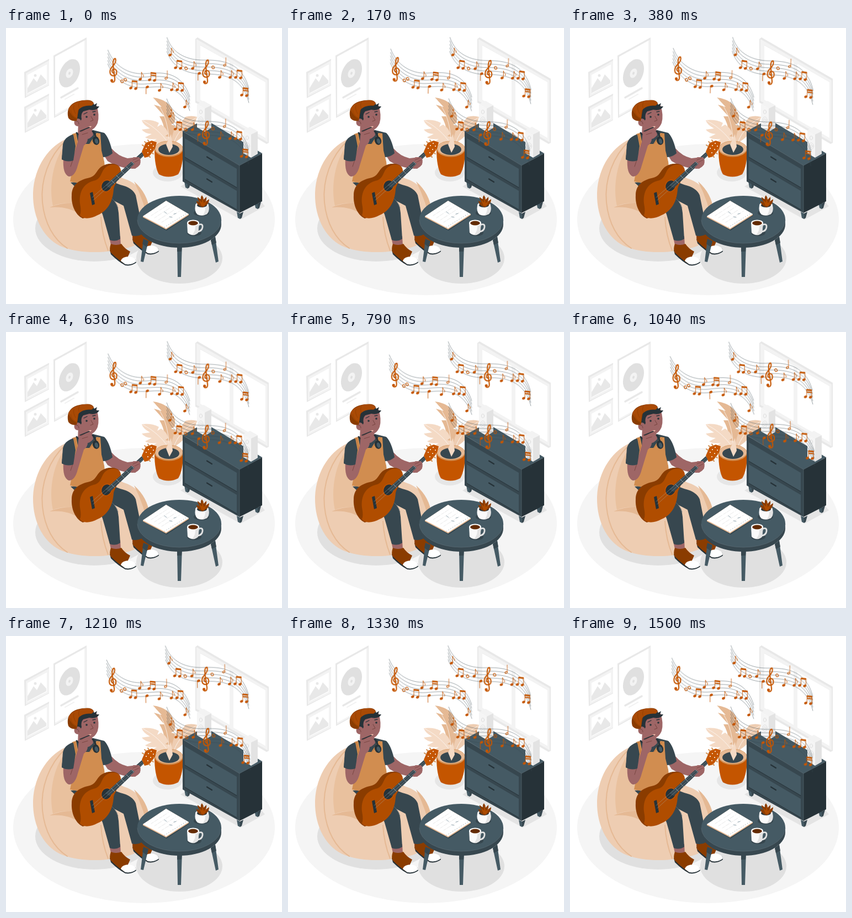
An HTML page without scripts for the animation above (1540 ms loop, 500 by 500 pixels).

```html
<!DOCTYPE html>
<html lang="en">
<head>
<meta charset="utf-8">
<title>Guitar and music</title>
<style>
html, body { margin: 0; width: 100%; height: 100%; overflow: hidden; background: #fff; }
svg { display: block; width: 100vw; height: 100vh; }
.navy { fill: #37474f; }
.slate { fill: #455a64; }
.ink { fill: #263238; }
.skin { fill: #9e6666; }
.orange { fill: #c45500; }
.brown { fill: #8a3c00; }
.tan { fill: #d18d50; }
.peach { fill: #eecdb2; }
.fold { fill: #e5b994; }
.white { fill: #fff; }
.pale { fill: #f3f3f3; }
.edge { fill: #e8e8e8; }
.grey { fill: #e0e0e0; }
.line { fill: none; stroke-linecap: round; stroke-linejoin: round; }
.staff { fill: none; stroke: #37474f; stroke-width: .5; }
.note { fill: #c45500; }
.stem { fill: none; stroke: #c45500; stroke-width: .9; }
.ring { fill: none; stroke: #c45500; stroke-width: 1.1; }
#music { transform-origin: 312px 131px; animation: sway 1540ms linear infinite; }
@keyframes sway {
  0%, 97.3%, 100% { transform: rotate(.22deg); }
  21.62% { transform: rotate(2deg); }
  70.27% { transform: rotate(-2deg); }
}
</style>
</head>
<body>
<svg viewBox="0 0 500 500">
<defs>
  <ellipse id="head" class="note" rx="2.9" ry="2.3" transform="rotate(-25)"/>
  <g id="eighth">
    <use href="#head"/>
    <path class="stem" d="M2.3-1V-13Q2.500-10 5.500-8Q7-6 5.500-4"/>
  </g>
  <g id="pair">
    <use href="#head"/><use href="#head" x="9" y="1"/>
    <path class="stem" d="M2.300-1V-13M11.300 0V-12"/>
    <path class="note" d="M1.900-14L11.700-13V-10L1.900-11Z"/>
  </g>
  <g id="double">
    <use href="#pair"/><path class="note" d="M2-9.500L11.500-8.500V-6.500L2-7.500Z"/>
  </g>
  <g id="down"><use href="#head"/><path class="stem" d="M-2.300 0V13"/></g>
  <ellipse id="ring" class="ring" rx="2.2" ry="2.7" transform="rotate(-30)"/>
  <g id="half" class="ring"><ellipse rx="2.2" ry="1.7" transform="rotate(-25)"/><path d="M2-1V-14" stroke-width=".8"/></g>
  <g id="clef" class="line" stroke="#c45500" stroke-width="2.1">
    <path d="M1 5C-3 5-3-2 2-2C8-2 8 10 1 10C-8 10-7-1-2-6C3-11 6-16 4-21C0-22-1-14 0-8L3 16C3 23-3 23-4 18"/>
    <circle cx="-2.5" cy="18.5" r="1.5" fill="#c45500"/>
  </g>
  <path id="curveA" d="M184 40C196 70 222 84 248 83S316 72 333 125"/>
  <path id="curveB" d="M291 17C302 49 331 58 356 58S427 56 440 110"/>
  <g id="phrase">
    <g class="staff">
      <use href="#curveB"/><use href="#curveB" y="6.3"/><use href="#curveB" y="12.6"/>
      <use href="#curveB" y="18.9"/><use href="#curveB" y="25.2"/>
    </g>
    <use href="#eighth" x="297" y="49"/><use href="#pair" x="307" y="72"/>
    <use href="#ring" x="326" y="73"/><use href="#eighth" x="338" y="73"/>
    <use href="#down" x="350" y="82"/><use href="#clef" x="362" y="79"/>
    <use href="#ring" x="375" y="71"/><use href="#eighth" x="387" y="89"/>
    <use href="#half" x="396" y="67"/><use href="#eighth" x="406" y="89"/>
    <use href="#pair" x="416" y="89"/><use href="#double" x="427" y="121"/>
  </g>
  <g id="picture">
    <path class="edge" d="M33 80L78 56V104L34 127Z"/>
    <path class="pale" d="M36 82L78 59V103L36 124Z"/>
    <path class="white" d="M39 85L74 66V101L39 119Z"/>
    <path class="edge" d="M39 109L50 91L56 98L63 84L73 95V100L39 118Z"/>
    <circle class="edge" cx="53" cy="86" r="2.5"/>
  </g>
  <g id="speaker">
    <path class="pale" d="M0 6L12 0L26 8L14 14Z"/>
    <path d="M0 6L14 14V56L0 48Z" fill="#f5f5f5"/>
    <path d="M14 14L26 8V49L14 56Z" fill="#e3e3e3"/>
    <g class="line" stroke="#d9d9d9" stroke-width=".8">
      <ellipse cx="7" cy="20" rx="2.6" ry="3.5"/><ellipse cx="7" cy="35" rx="4.2" ry="6"/>
      <ellipse cx="7" cy="35" rx="1.8" ry="2.6"/>
    </g>
  </g>
  <g id="drawer">
    <path class="slate" d="M324 200L418 255V289L324 234Z"/>
    <path class="line" d="M324 234L418 289" stroke="#263238"/>
    <path class="line" d="M364 233.500L373 239" stroke="#263238" stroke-width="2.2"/>
  </g>
  <g id="foot">
    <path class="slate" d="M0 0L6 3V13L2 11Z"/>
    <path class="navy" d="M6 3L12 0L9 11L6 13Z"/>
  </g>
  <g id="shoe">
    <path class="ink" d="M188 402L190 410Q203 423 216 430Q227 432 236 425L235 420Z"/>
    <path class="brown" d="M190 391Q187 399 189 406Q203 420 215 427L225 405Q215 400 209 391Q199 395 190 391Z"/>
    <path class="white" d="M208 422Q210 414 224 414Q234 416 236 423Q228 430 216 428Z"/>
  </g>
</defs>

<ellipse cx="250" cy="347" rx="237" ry="137" fill="#f5f5f5"/>

<g id="wall">
  <use href="#picture"/><use href="#picture" y="63"/>
  <path class="edge" d="M86 50L146 17V130L87 163Z"/>
  <path class="pale" d="M89 52L145 21V129L89 160Z"/>
  <path class="white" d="M89 52L142 23V128L89 157Z"/>
  <ellipse class="grey" cx="115" cy="82" rx="17" ry="27" transform="rotate(24 115 82)"/>
  <ellipse class="pale" cx="115" cy="82" rx="6" ry="9" transform="rotate(24 115 82)"/>
  <ellipse class="grey" cx="115" cy="82" rx="1.8" ry="2.8" transform="rotate(24 115 82)"/>
  <path class="line" d="M100 126L130 109" stroke="#e8e8e8" stroke-width="3.5"/>
  <path class="line" d="M107 129L123 120" stroke="#f0f0f0" stroke-width="2"/>
  <path class="edge" fill-rule="evenodd" d="M343 20L347 17L476 92V208L472 210L343 135ZM351 31V131L405 162V61ZM411 64V166L470 200V98Z"/>
  <path class="pale" fill-rule="evenodd" d="M345 20L474 95V207L345 132ZM352 31V130L405 161V61ZM412 65V166L470 199V98Z"/>
</g>

<g id="shadows" class="grey">
  <ellipse cx="160" cy="363" rx="107" ry="60"/>
  <ellipse cx="314" cy="417" rx="78" ry="46"/>
  <ellipse cx="293" cy="262" rx="27" ry="16" fill="#e6e6e6"/>
  <path d="M316 287L331 278L463 316L469 323L425 347Z" opacity=".8"/>
</g>

<g id="plant">
  <path class="fold" d="M291 214C288 195 289 178 278 160L287 160L268 139L282 143L266 126C285 128 299 138 302 150L296 152L304 153Q308 162 305 172L299 175L306 177Q306 195 300 218Z"/>
  <path class="peach" d="M298 219C299 196 305 177 316 165L317 172L325 161Q336 158 346 161Q342 178 331 184L323 184L328 187Q319 199 309 205L303 220Z"/>
  <path d="M297 220C284 219 270 212 264 207L273 201Q259 203 252 198L264 192Q251 191 246 184L261 182Q248 175 246 167Q264 165 277 172L274 179L281 175Q292 182 294 192L288 196L295 197Q302 207 302 219Z" fill="#f4dac5"/>
  <path class="line" d="M296 216C295 185 291 154 267 127M301 216C309 190 323 174 344 163M299 216C283 190 265 177 248 168" stroke="#fff" stroke-width=".7"/>
  <path class="orange" d="M269 220C269 240 272 257 277 265Q294 274 312 265C318 255 321 239 321 220Z"/>
  <ellipse class="tan" cx="295" cy="219" rx="26" ry="14.5"/>
  <ellipse class="fold" cx="295" cy="218" rx="25" ry="13"/>
  <ellipse class="navy" cx="295" cy="220" rx="19" ry="10"/>
  <path d="M290 211L296 226L302 215L299 192Z" fill="#f4dac5"/>
</g>

<g id="cabinet">
  <use href="#foot" x="323" y="278"/><use href="#foot" x="418" y="333"/><use href="#foot" x="450" y="315"/>
  <path class="slate" d="M320 187L360 165L464 227L423 250Z"/>
  <path class="navy" d="M320 187L423 249V335L320 278Z"/>
  <path class="ink" d="M423 249L464 227V314L423 335Z"/>
  <use href="#drawer"/><use href="#drawer" y="40"/>
  <path class="line" d="M320 187L423 249L464 227M423 249V334" stroke="#607078" stroke-width=".6"/>
  <use href="#speaker" x="346" y="132"/><use href="#speaker" x="430" y="179"/>
</g>

<g id="beanbag">
  <path class="peach" d="M112 200C79 212 51 250 49 299C48 346 70 384 103 397C142 411 190 407 225 397C255 388 263 356 260 330C255 300 238 280 211 272Z"/>
  <path d="M106 213C86 240 77 285 85 322Q101 316 124 317V225Z" fill="#e9c19e"/>
  <path class="line" d="M107 205C78 232 62 275 66 316C70 354 86 383 111 399" stroke="#e5b994" stroke-width="2"/>
  <path class="fold" d="M79 325Q101 316 123 317L134 338Q112 322 79 325ZM232 278Q257 300 260 331Q262 341 258 355Q251 315 232 278Z"/>
  <path class="line" d="M172 343Q174 376 185 403" stroke="#e5b994" stroke-width="2"/>
</g>

<g id="person">
  <g id="legs">
    <path class="skin" d="M187 379L207 377L208 394Q199 400 190 393ZM227 371L246 368L247 383Q238 387 230 381Z"/>
    <use href="#shoe" x="41" y="-20"/><use href="#shoe"/>
    <path class="navy" d="M118 270L178 273L207 284Q229 289 235 303L249 372Q239 379 228 376L213 322L190 310Z"/>
    <path class="navy" d="M117 280L166 324Q174 331 177 345L188 384Q198 388 207 382L204 335Q203 318 190 307L161 276Z"/>
    <path class="line" d="M188 306Q200 314 203 326" stroke="#5c6e77" stroke-width=".8"/>
  </g>
  <path class="skin" d="M174 225L191 218Q203 232 220 236L238 234Q245 239 243 247Q235 258 224 254Q202 253 184 241Z"/>
  <path class="navy" d="M128 190Q108 196 104 210L101 238Q110 243 121 240L120 270L178 263L176 234Q185 234 193 227Q188 200 178 190L158 185Z"/>
  <path class="skin" d="M131 171L155 176L158 194Q146 209 130 194Z"/>
  <path class="tan" d="M120 192L127 190L131 210L151 210L164 190L171 191L173 222L178 242L181 271Q153 288 116 278Q122 254 120 223Z"/>
  <path class="line" d="M124 192L128 212M152 210L166 193" stroke="#bd7335"/>
  <g id="face">
    <path class="skin" d="M128 152L164 140Q170 158 166 172Q160 187 145 186Q134 181 130 172Z"/>
    <path class="ink" d="M125 153L133 143L158 136L160 139L165 136L163 142L169 142Q164 151 151 148L140 151Q135 156 137 165L134 171Q127 166 125 153Z"/>
    <ellipse class="skin" cx="130" cy="171" rx="6.5" ry="7"/>
    <path class="line" d="M127 169Q132 168 132 174" stroke="#75433f"/>
    <path class="brown" d="M113 163C108 144 120 132 141 131Q155 129 159 136L155 141Q140 139 132 147L128 168Q118 170 113 163Z"/>
    <path d="M113 147Q120 134 142 131Q155 130 159 137L156 140Q136 140 130 150L129 165Q119 161 113 147Z" fill="#a94a05"/>
    <path class="line" d="M129 164Q119 160 117 149M126 155Q121 147 123 140M133 146Q130 140 133 134" stroke="#8a3c00" stroke-width=".6"/>
    <circle class="ink" cx="146" cy="161" r="1.8"/><circle class="ink" cx="160" cy="157" r="1.8"/>
    <path class="line" d="M141 156L147 153M157 152L162 151" stroke="#263238" stroke-width="1.3"/>
    <path class="line" d="M154 160L158 167L153 169" stroke="#75433f"/>
    <path d="M149 179Q152 177 155 178L153 181Z" fill="#eab6a6"/>
  </g>
  <path class="line" d="M128 190Q133 197 143 196M157 187Q163 192 162 200" stroke="#263238" stroke-width="3"/>
  <ellipse class="ink" cx="163" cy="204" rx="6" ry="8" transform="rotate(-18 163 204)"/>
  <ellipse class="slate" cx="164" cy="205" rx="3" ry="5" transform="rotate(-18 164 205)"/>
  <g id="raised-arm">
    <path class="skin" d="M104 235L120 239L130 206L132 188L141 180L154 180L154 184L145 187L151 189L147 193L148 201Q148 208 141 213L130 249Q125 269 114 269Q102 265 104 235Z"/>
    <path class="line" d="M136 188L143 184M138 193L148 190M121 239L117 251" stroke="#75433f" stroke-width=".9"/>
    <path class="line" d="M134 187L151 180" stroke="#263238" stroke-width="1.5"/>
    <path class="navy" d="M122 193Q106 197 103 211L101 238Q111 244 122 240L126 214Z"/>
  </g>
</g>

<g id="guitar">
  <path class="brown" d="M119 303C119 286 130 276 148 272C164 269 163 258 173 251C185 243 203 244 207 254L199 282L171 336L139 345C125 338 118 320 119 303Z"/>
  <path d="M134 318C132 296 141 282 158 277C174 274 171 260 181 252C192 244 207 247 208 258C209 268 198 278 195 291C194 313 185 331 166 339C153 346 139 347 134 339Q137 333 134 318Z" fill="#b04d00"/>
  <ellipse class="orange" cx="182" cy="286" rx="10" ry="11.5" transform="rotate(30 182 286)"/>
  <ellipse class="ink" cx="182" cy="286" rx="8.5" ry="10" transform="rotate(30 182 286)"/>
  <path class="ink" d="M152 299L157 297L161 319L156 321Z"/>
  <path class="navy" d="M180 285L246 225L251 230L188 290Z"/>
  <path class="line" d="M156 307L248 227M158 312L250 229" stroke="#aab5ba" stroke-width=".4"/>
  <path class="line" d="M191 276L197 282M200 267L206 273M209 259L215 265M218 251L224 257M227 242L233 248" stroke="#c7ced1" stroke-width=".6"/>
  <path class="orange" d="M246 224L253 208L264 204L273 207L270 219L259 233L251 235Z"/>
  <path class="line" d="M250 214L247 212M254 208L251 206M259 206L257 203M268 220L271 222M264 226L267 228M259 232L261 234" stroke="#d18d50" stroke-width="2"/>
  <g class="white">
    <circle cx="254" cy="218" r="1"/><circle cx="258" cy="213" r="1"/><circle cx="263" cy="209" r="1"/>
    <circle cx="257" cy="226" r="1"/><circle cx="262" cy="220" r="1"/><circle cx="267" cy="214" r="1"/>
  </g>
  <path class="skin" d="M224 239L231 234L241 234Q246 239 242 248L234 255L225 253L233 246Z"/>
  <path class="line" d="M230 239L238 236M233 243L241 239" stroke="#75433f" stroke-width=".8"/>
</g>

<g id="table">
  <path class="slate" d="M249 382L258 386L249 424L244 423ZM371 384L379 378L385 423L380 425ZM310 391H319L317 451H311Z"/>
  <path class="navy" d="M249 382L258 386L255 397L247 391ZM371 384L379 378L381 389L373 393ZM310 391H319L318 405H310Z"/>
  <path class="navy" d="M238 346V356A76 42 0 0 0 390 356V346Z"/>
  <ellipse class="slate" cx="314" cy="347" rx="76" ry="43"/>
  <path class="line" d="M238 348A76 42 0 0 0 390 348" stroke="#607078" stroke-width=".6"/>
  <path class="ink" d="M249 344L292 316L332 340L291 367Z" opacity=".5"/>
  <path class="fold" d="M248 341L290 313L331 337V339L290 365L248 343Z"/>
  <path class="white" d="M248 341L290 313L331 337L290 363Z"/>
  <path class="line" d="M287 361L327 336" stroke="#90a0a8" stroke-width="1" stroke-dasharray=".5 4"/>
  <g class="line" stroke="#dadada" stroke-width=".6">
    <path d="M263 340L294 320M269 344L300 324M276 348L307 328M282 352L314 332" stroke-dasharray="5 2 8 3"/>
    <path d="M287 333l4 3M296 342l5 1M304 337l4-1" stroke="#78909c" stroke-width=".8"/>
  </g>
  <g id="succulent">
    <ellipse class="navy" cx="354" cy="335" rx="14" ry="6"/>
    <path d="M343 321Q341 333 347 338Q355 342 364 337Q369 332 367 321Z" fill="#fafafa"/>
    <path d="M360 322H367Q369 332 364 337L356 340Q363 331 360 322Z" fill="#e3e3e3"/>
    <ellipse cx="355" cy="321" rx="12" ry="5.5" fill="#eee"/>
    <ellipse class="ink" cx="355" cy="321" rx="9" ry="3.8"/>
    <path class="brown" d="M350 322Q345 318 345 313L351 316Q347 311 347 306L353 311Q352 306 355 303Q358 307 358 311L363 306Q364 311 361 315L368 310Q368 317 363 321L356 325Z"/>
    <path class="orange" d="M354 322L350 312L355 316L356 306L358 317L365 312L359 323Z" opacity=".6"/>
  </g>
  <g id="mug">
    <ellipse class="navy" cx="341" cy="371" rx="13" ry="6"/>
    <path class="line" d="M348 357Q357 353 356 361Q355 368 347 369" stroke="#e3e3e3" stroke-width="2.8"/>
    <path d="M328 353L329 371Q338 379 348 371L350 353Z" fill="#fafafa"/>
    <path d="M343 355L350 353L348 371Q343 376 337 375Q344 368 343 355Z" fill="#e3e3e3"/>
    <ellipse class="white" cx="339" cy="353" rx="11" ry="5.5"/>
    <ellipse cx="339" cy="353.500" rx="8.800" ry="4" fill="#632b05"/>
  </g>
</g>

<g id="music">
  <g class="staff">
    <use href="#curveA"/><use href="#curveA" y="6.3"/><use href="#curveA" y="12.6"/>
    <use href="#curveA" y="18.9"/><use href="#curveA" y="25.2"/>
  </g>
  <use href="#clef" x="194" y="77"/>
  <use href="#ring" x="210" y="97"/><use href="#ring" x="216" y="94"/>
  <use href="#pair" x="226" y="109"/><use href="#eighth" x="243" y="93"/>
  <use href="#down" x="256" y="107"/><use href="#double" x="260" y="94"/>
  <use href="#eighth" x="278" y="113"/><use href="#half" x="290" y="91"/>
  <use href="#eighth" x="300" y="112"/><use href="#pair" x="310" y="112"/>
  <use href="#eighth" x="324" y="143"/>
  <use href="#phrase"/><use href="#phrase" y="111"/>
</g>
</svg>
</body>
</html>
```
